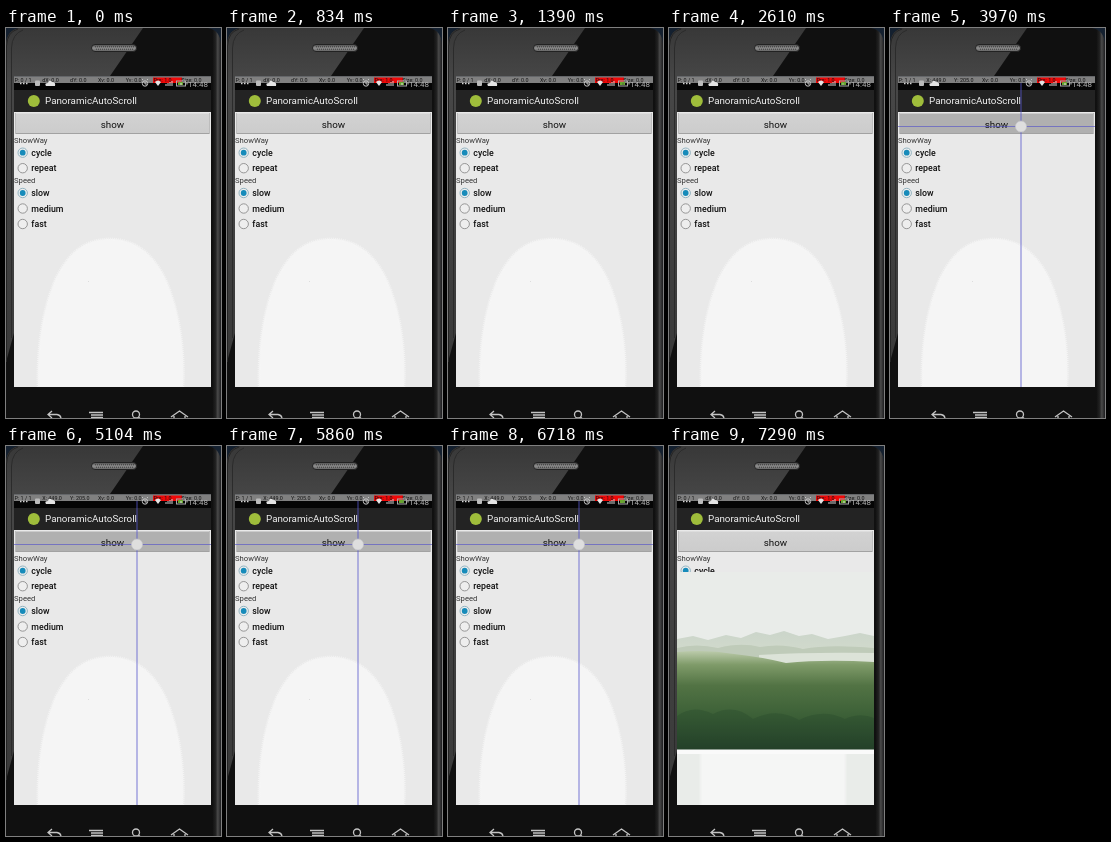
These frames come from a looping animation (215 px wide and 390 px high, 8 s). An HTML page:

```html
<!DOCTYPE html>
<html lang="en">
<head>
<meta charset="utf-8">
<title>PanoramicAutoScroll</title>
<style>
html, body { margin: 0; width: 100%; height: 100%; overflow: hidden; background: #101010; }
svg { display: block; width: 100vw; height: 100vh; }
text { font-family: Roboto, "Noto Sans", sans-serif; fill: #161616; }
.title { font-size: 9.8px; fill: #f2f2f2; }
.label { font-size: 7.7px; fill: #333; }
.option { font-size: 8.8px; font-weight: 500; fill: #111; }
.probe { font-size: 5.4px; fill: #111; }
.clock { font-size: 8px; fill: #b0b0b0; }
.line { fill: none; stroke: #c4c4c4; stroke-width: 1.3; }
</style>
</head>
<body>
<svg viewBox="0 0 215 390" preserveAspectRatio="none">
  <defs>
    <linearGradient id="edge">
      <stop offset=".96" stop-color="#101010"/>
      <stop offset=".975" stop-color="#222"/>
      <stop offset=".985" stop-color="#4a4a4a"/>
      <stop offset="1" stop-color="#1c1c1e"/>
    </linearGradient>
    <linearGradient id="glare" x2="0" y2="1">
      <stop offset="0" stop-color="#383838"/>
      <stop offset=".16" stop-color="#474747"/>
      <stop offset="1" stop-color="#3a3a3a"/>
    </linearGradient>
    <linearGradient id="speaker" x2="0" y2="1">
      <stop offset="0" stop-color="#4c4c4c"/>
      <stop offset=".5" stop-color="#909090"/>
      <stop offset="1" stop-color="#606060"/>
    </linearGradient>
    <linearGradient id="button" x2="0" y2="1">
      <stop offset="0" stop-color="#d2d2d2"/>
      <stop offset="1" stop-color="#cccccc"/>
    </linearGradient>
    <linearGradient id="hills" x2="0" y2="1">
      <stop offset="0" stop-color="#cbd5ca"/>
      <stop offset="1" stop-color="#d5ddcd"/>
    </linearGradient>
    <linearGradient id="forest" x2="0" y2="1">
      <stop offset="0" stop-color="#bccbab"/>
      <stop offset=".14" stop-color="#7f9b69"/>
      <stop offset=".35" stop-color="#527344"/>
      <stop offset=".65" stop-color="#3c6037"/>
      <stop offset="1" stop-color="#243f29"/>
    </linearGradient>
    <clipPath id="screen"><rect x="8" y="48" width="197" height="311"/></clipPath>
  </defs>

  <rect width="215" height="390" fill="#14202f"/>
  <path d="M0 390V16Q1 2 13 0H202Q214 2 215 16V390Z" fill="url(#edge)"/>
  <path d="M0 334V16Q1 2 13 0H137L104 48H8V305Z" fill="url(#glare)"/>
  <path d="M.5 334V18Q1 4 12 1" fill="none" stroke="#232323"/>
  <path d="M5.5 310V20Q6 6 17 2" fill="none" stroke="#2b2b2b"/>
  <rect x="85.5" y="16.5" width="45" height="7" rx="3.5" fill="url(#speaker)" stroke="#222"/>
  <path d="M89 18.8H128M90 21.2H128" stroke="#333" stroke-width=".9" stroke-dasharray="1 1"/>

  <g clip-path="url(#screen)">
    <rect x="8" y="48" width="197" height="15" fill="#050505"/>
    <rect x="8" y="62" width="197" height="22" fill="#232323"/>
    <rect x="8" y="84" width="197" height="275" fill="#e9e9e9"/>
    <circle cx="27.8" cy="73" r="6" fill="#9fbd3b"/>
    <text class="title" x="39" y="76.3">PanoramicAutoScroll</text>

    <path d="M32 359C31 324 35 284 50 250C65 219 84 211 104 211S144 220 159 250C174 283 179 324 177 359Z"
      fill="#f5f5f5" stroke="#f4f4f4" stroke-width="2.5" stroke-dasharray="1 1"/>
    <rect x="82" y="253" width="1" height="1" fill="#ddd"/>
    <rect id="press" x="9" y="85.5" width="195" height="20"/>
    <path d="M9 105.5H204" stroke="#a2a2a2"/>
    <path d="M9.5 85V106M203.5 85V106" stroke="#bcbcbc"/>
    <text class="title" x="106.5" y="99.5" text-anchor="middle" style="fill:#111">show</text>
    <text class="label" x="8" y="115.4">ShowWay</text>
    <text class="label" x="8" y="155.4">Speed</text>
    <g id="options"></g>

    <g id="photo">
      <rect x="8" y="126" width="197" height="233" fill="#e9ece9"/>
      <rect x="31.5" y="306" width="145" height="60" fill="#f5f6f5" stroke="#f0f1f0" stroke-width="2"/>
      <path d="M8 193L24 190L39 194L57 189L72 192L87 186L101 189L115 185L130 190L143 188L159 193L176 190L191 187L205 190V219H8Z" fill="url(#hills)"/>
      <path d="M8 202Q27 197 49 202Q72 196 91 201Q112 197 134 203Q160 198 205 202V225H8Z" fill="#bfcbb9"/>
      <path d="M90 209Q139 206 205 207V219H90Z" fill="#dce3d8"/>
      <path d="M8 206Q38 203 65 208Q93 211 117 217Q156 213 205 216V304H8Z" fill="url(#forest)"/>
      <path d="M8 270Q24 258 44 268Q65 257 84 273Q108 261 130 274Q154 262 176 273Q191 266 205 272V304H8Z" fill="#234328" opacity=".3"/>
      <rect x="8" y="303.5" width="197" height="4.5" fill="#fafafa"/>
    </g>

    <rect x="8" y="48" width="197" height="7" fill="#808080"/>
    <rect x="147" y="49.5" width="29" height="5.5" fill="#f00808"/>
    <path d="M8 48.5H205" stroke="#65676a"/>
    <g id="probe"></g>

    <g fill="#e4e4e4">
      <path d="M14 55.5H22" stroke="#d4d4d4" stroke-width="1.5" stroke-dasharray="1.5 1.5"/>
      <rect x="29" y="52.5" width="5" height="5.5" rx="1" fill="#bbb"/>
      <path d="M40 58Q38 55 42 55Q43 51 46 54Q50 54 49 58Z"/>
      <path d="M149 54Q152 51 155 54L152 58Z"/>
      <path d="M160 58V56M162 58V55M164 58V54M166 58V53" stroke="#d4d4d4"/>
    </g>
    <g class="line" style="stroke-width:1">
      <circle cx="139" cy="55.5" r="2.7"/>
      <path d="M139 54V56H141M136 52L137 51M142 52L141 51"/>
      <rect x="170.5" y="53" width="9" height="5" stroke="#aaa"/>
      <path d="M181 54.5V56.5"/>
    </g>
    <rect x="172" y="54" width="5" height="3" fill="#69a52e"/>
    <rect id="charge" y="55" width="2" height="2"/>
    <text class="clock" x="182" y="59">14:48</text>

    <g id="pointer">
      <path d="M131 55V359" stroke="#5655ca" stroke-width="2" stroke-opacity=".4"/>
      <path d="M8 98.5H205" stroke="#5655ca" stroke-opacity=".65"/>
      <circle cx="131" cy="98.5" r="5.5" fill="#dedede" stroke="#c6c6cc" stroke-width=".7"/>
    </g>
  </g>

  <rect x="8" y="359" width="198" height="31" fill="#101010"/>
  <g class="line">
    <path d="M46 383L42 386.5L46 390M42 386.5H51Q55 387 55 391"/>
    <path d="M83 384.5H97M85 387H97M85 389.5H97"/>
    <circle cx="130" cy="386.5" r="3.5"/><path d="M132.5 389L136 392.5"/>
    <path d="M165 389L173.5 383L182 389M168 388V392M179 388V392"/>
  </g>
</svg>
<script>
const byId = id => document.getElementById(id);
const options = [["cycle", 124.7, true], ["repeat", 140.2], ["slow", 165, true], ["medium", 180.5], ["fast", 196]];
byId("options").innerHTML = options.map(([name, y, on]) => `
  <circle cx="16.7" cy="${y}" r="4.7" fill="#eee" stroke="${on ? "#87adbc" : "#8d8d8d"}" stroke-width=".9"/>
  ${on ? `<circle cx="16.7" cy="${y}" r="2.9" fill="#168bba"/>` : ""}
  <text class="option" x="25.3" y="${y + 3.1}">${name}</text>`).join("");

const fields = ["P: 0 / 1", "dX: 0.0", "dY: 0.0", "Xv: 0.0", "Yv: 0.0", "Prs: 1.0", "Size: 0.0"];
byId("probe").innerHTML = fields.map((value, i) =>
  `<text class="probe" x="${8.5 + i * 27.8}" y="54">${value}</text>`).join("");
const probes = byId("probe").children;

const steps = [
  { at: 0, charge: [174, "#a5c48b"] },
  { at: 1390, charge: [174, "#558832"] },
  { at: 2610, charge: [173, "#86b664"] },
  { at: 3970, charge: [174, "#a5c48b"], down: true },
  { at: 5860, charge: [175, "#659b3c"], down: true },
  { at: 7290, charge: [174, "#a5c48b"], photo: true }
];
let shown;

function show(step) {
  const { charge: [x, color], down, photo } = step;
  byId("pointer").style.display = down ? "" : "none";
  byId("photo").style.display = photo ? "" : "none";
  byId("press").setAttribute("fill", down ? "#b0b0b0" : "url(#button)");
  byId("charge").setAttribute("x", x);
  byId("charge").setAttribute("fill", color);
  ["P: 1 / 1", "X: 449.0", "Y: 205.0"].forEach((value, i) => {
    probes[i].textContent = down ? value : fields[i];
  });
}

const start = performance.now();
function tick() {
  const time = (performance.now() - start) % 8000;
  const step = steps.findLast(item => item.at <= time);
  if (step !== shown) show(shown = step);
  requestAnimationFrame(tick);
}
tick();
</script>
</body>
</html>
```
